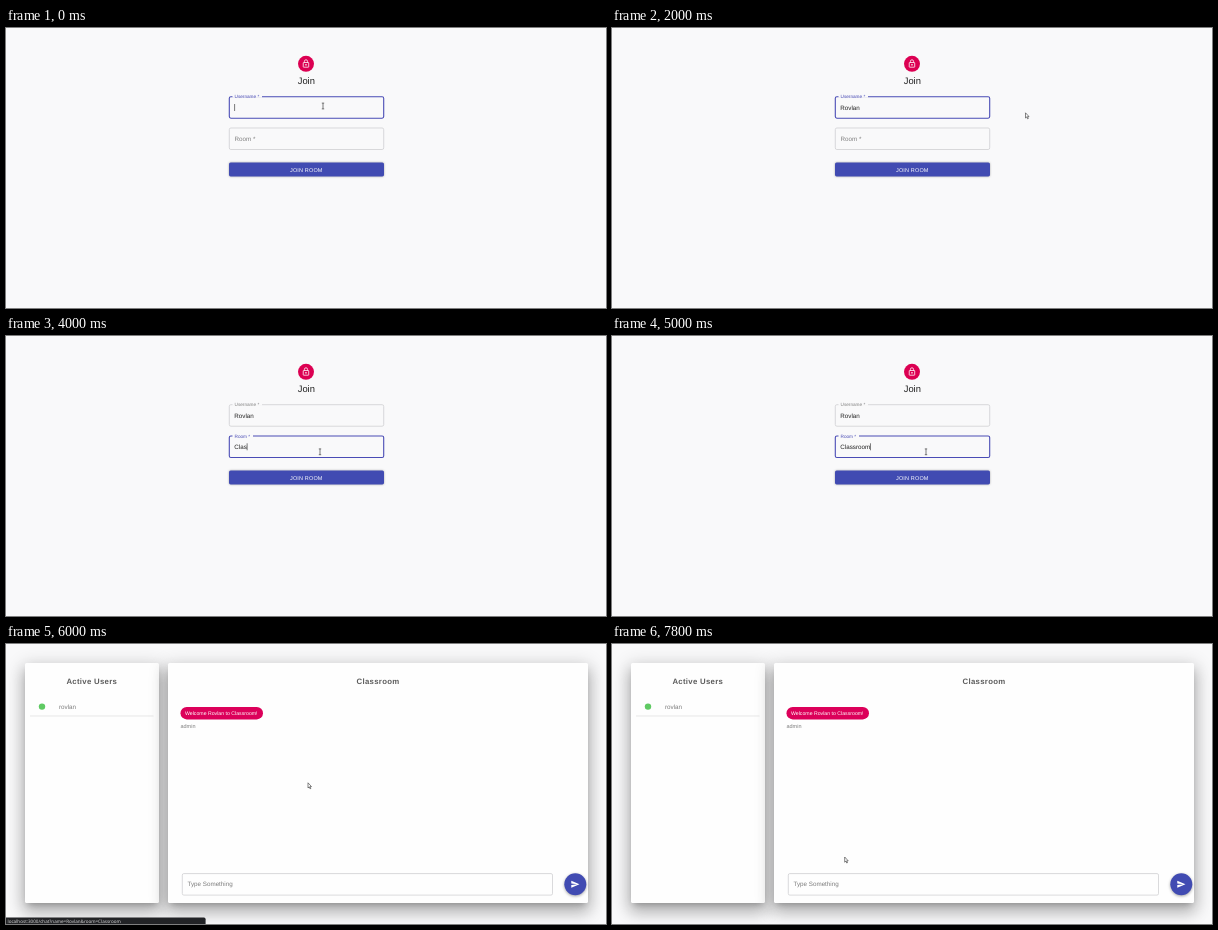
An HTML page for the animation above (8 s loop, 600 by 280 pixels).

```html
<!DOCTYPE html>
<html lang="en">
<head>
<meta charset="utf-8">
<title>Join a room</title>
<style>
  html, body { margin: 0; width: 100%; height: 100%; overflow: hidden; background: #f9f9fa; }
  #stage { position: relative; width: 600px; height: 280px; overflow: hidden; }
  svg { position: absolute; left: 0; top: 0; }
  text { font-family: "Liberation Sans", Arial, sans-serif; font-size: 6.25px; fill: #222; text-rendering: geometricPrecision; white-space: pre; }
  .panel {
    position: absolute; top: 18.5px; height: 240.5px; border-radius: 1.5px; background: #fefefe;
    box-shadow: 0 4px 6px -3px rgba(0,0,0,.24), 0 9px 15px 1px rgba(0,0,0,.18), 0 4px 18px 3px rgba(0,0,0,.16);
  }
  .middle { text-anchor: middle; }
  .title { font-size: 7.8px; font-weight: bold; letter-spacing: .3px; fill: #5c5c5c; }
  .hint { fill: #7c7c7c; }
  .white { fill: #fff; }
  .box { fill: none; stroke: #cbcbcd; stroke-width: .7; }
  .label { fill: #808080; }
  .notch { stroke: #f9f9fa; stroke-width: 2; }
  .caret { stroke: #222; stroke-width: .6; }
  .focus .box { stroke: #4a4cb5; stroke-width: 1.1; }
  .focus .label { fill: #4a4cb5; }
  .list text { font-family: "Open Sans", "Noto Sans", sans-serif; font-size: 5px; font-weight: 600; fill: #f3f3f3; }
  #status text { font-family: "Open Sans", "Noto Sans", sans-serif; font-size: 4.6px; fill: #e2e2e2; }
  #button { fill: #414bb2; filter: drop-shadow(0 .8px .8px rgba(0,0,0,.3)); }
  #button.hover { fill: #333e9c; }
  .send { fill: #414bb2; filter: drop-shadow(0 1.5px 1.8px rgba(0,0,0,.35)); }
</style>
</head>
<body>
<div id="stage">
  <div id="join">
    <svg width="600" height="280">
      <circle cx="300" cy="35.8" r="8" fill="#dc0052"/>
      <g transform="translate(295.3 31) scale(.39)" fill="none" stroke="#fff" stroke-width="2">
        <rect x="5" y="9" width="14" height="12" rx="1"/>
        <path d="M8 9V6a4 4 0 0 1 8 0v3"/>
        <circle cx="12" cy="15" r="2" fill="#fff" stroke="none"/>
      </g>
      <text class="middle" x="300.3" y="56" style="font-size:9.4px">Join</text>
      <g id="user">
        <rect class="box" x="223.3" y="68.7" width="154.4" height="21.5" rx="1.6"/>
        <path class="notch" d="M226.5 68.7H256"/>
        <text class="label" x="228.5" y="70.2" font-size="4.7">Username *</text>
        <text class="value" x="228.3" y="81.7"></text>
        <path class="caret" d="M0 76v7"/>
      </g>
      <g id="room">
        <rect class="box" x="223.3" y="100" width="154.4" height="21.5" rx="1.6"/>
        <path class="notch" d="M226.5 100H247"/>
        <text class="label" x="228.5">Room *</text>
        <text class="value" x="228.3" y="113"></text>
        <path class="caret" d="M0 107.3v7"/>
      </g>
      <rect id="button" x="223" y="134.6" width="155" height="13.8" rx="1.6"/>
      <ellipse id="ripple" cx="301" cy="141.5" rx="48" ry="6.9" fill="#fff" opacity=".2"/>
      <text class="middle white" x="300.3" y="143.5" style="font-size:5.5px;letter-spacing:.157px">JOIN ROOM</text>
      <g id="list" class="list">
        <rect x="222.6" y="90.2" width="155.2" height="91" rx="1" fill="#27292b" style="filter:drop-shadow(0 .8px 1px rgba(0,0,0,.35))"/>
      </g>
    </svg>
  </div>
  <div id="chat">
    <div class="panel" style="left:18.5px;width:134.5px"></div>
    <div class="panel" style="left:162px;width:420px"></div>
    <svg width="600" height="280">
      <text class="title middle" x="85.8" y="40">Active Users</text>
      <circle cx="36" cy="62.6" r="3.2" fill="#5fca63"/>
      <text class="hint" x="53" y="65">rovlan</text>
      <path d="M24 72H147.5" stroke="#dcdcdc" stroke-width=".7"/>
      <text class="title middle" x="372" y="40">Classroom</text>
      <rect x="174.5" y="63" width="82.5" height="12.4" rx="6.2" fill="#dc005a"/>
      <text class="white" x="179" y="71.1" style="font-size:5.2px">Welcome Rovlan to Classroom!</text>
      <text class="hint" x="174.5" y="84.2" style="font-size:5.5px">admin</text>
      <rect class="box" x="176.3" y="229.6" width="370.2" height="21.5" rx="1.5"/>
      <text class="hint" x="181.5" y="242.4">Type Something</text>
      <circle class="send" cx="569.3" cy="240.2" r="11"/>
      <path class="white" transform="translate(564.5 235.5) scale(.39)" d="M2 21 23 12 2 3v7l15 2-15 2z"/>
    </svg>
  </div>
  <svg width="600" height="280">
    <g id="status">
      <path d="M0 273.6H198q1.6 0 1.6 1.6V280H0z" fill="#222326"/>
      <text x="1.5" y="278.9">localhost:3000/chat?name=Rovlan&amp;room=Classroom</text>
    </g>
    <g id="beam" fill="none" stroke="#444" stroke-width=".7">
      <path d="M-1.2-2.9H1.2M0-2.9V2.9M-1.2 2.9H1.2"/>
    </g>
    <g id="arrow" fill="#fff" stroke="#333" stroke-width=".6">
      <path d="M0 0V5.2L1.2 4.1 2 6 2.8 5.7 2 3.8H3.5z"/>
    </g>
    <g id="hand" fill="#fff" stroke="#333" stroke-width=".5">
      <path d="M-.5 0Q0-.6.5 0V2.2L2.7 2.8V4.6L2 6.3H-.7L-2.1 3.9-1.5 3.4-.5 4.2z"/>
    </g>
  </svg>
</div>
<script>
const STEP = 200, STEPS = 40;
const $ = id => document.getElementById(id);
const svgNS = "http://www.w3.org/2000/svg";

["rovlan", "rovlan411", "rovlandormek01@mail.test", "Rovlan", "rovlandormek", "rovlan dormek"].forEach((name, i) => {
  const row = document.createElementNS(svgNS, "text");
  row.setAttribute("x", 227.5);
  row.setAttribute("y", 102.4 + i * 14.1);
  row.textContent = name;
  $("list").append(row);
});

// Pointer stops: step, x, y
const path = [[0, 317, 78], [8, 317, 78], [9, 389, 83], [10, 413.5, 84.8], [11, 408, 90], [12, 372, 106],
  [13, 320, 115], [14, 314, 115.8], [25, 314, 115.8], [27, 304, 136], [28, 302, 138.8],
  [31, 302, 138.8], [33, 292, 151], [36, 258, 192], [39, 232.7, 213]];
// Letters typed: step, count
const userKeys = [[4, 2], [5, 4], [6, 5], [7, 6]];
const roomKeys = [[18, 1], [19, 2], [20, 4], [21, 5], [22, 7], [23, 9]];

const within = (k, from, to) => k >= from && k < to;
const show = (el, on) => { el.style.display = on ? "" : "none"; };
const typed = (word, keys, k) => word.slice(0, keys.reduce((n, [at, count]) => k >= at ? count : n, 0));

function pointerAt(k) {
  const i = Math.max(1, path.findIndex(p => p[0] >= k));
  const [k0, x0, y0] = path[i - 1], [k1, x1, y1] = path[i];
  const f = (k - k0) / (k1 - k0);
  return [x0 + (x1 - x0) * f, y0 + (y1 - y0) * f];
}

function drawField(id, text, focused, caretOn) {
  const field = $(id), value = field.querySelector(".value"), caret = field.querySelector(".caret");
  field.setAttribute("class", focused ? "focus" : "");
  value.textContent = text;
  const end = 228.6 + (text ? value.getComputedTextLength() : 0);
  caret.setAttribute("transform", `translate(${end} 0)`);
  show(caret, focused && caretOn);
}

function draw(k) {
  const chat = k >= 30, hover = within(k, 27, 30);
  show($("join"), !chat);
  show($("chat"), chat);
  show($("status"), within(k, 27, 32));
  show($("list"), within(k, 4, 10));
  show($("ripple"), k === 29);
  $("button").setAttribute("class", hover ? "hover" : "");

  if (!chat) {
    const roomFocus = within(k, 13, 29), floating = k >= 13;
    drawField("user", typed("Rovlan", userKeys, k), k < 13, k !== 1 && !within(k, 9, 11));
    drawField("room", typed("Classroom", roomKeys, k), roomFocus, !within(k, 16, 18) && k < 26);
    const label = $("room").querySelector(".label");
    label.setAttribute("y", floating ? 101.7 : 113);
    label.style.fontSize = floating ? "4.7px" : "6.25px";
    show($("room").querySelector(".notch"), floating);
  }

  const [x, y] = pointerAt(k);
  const shape = hover ? "hand" : k < 9 || within(k, 13, 26) ? "beam" : "arrow";
  for (const id of ["beam", "arrow", "hand"]) {
    show($(id), id === shape);
    $(id).setAttribute("transform", `translate(${x} ${y})`);
  }
}

document.querySelector("#user .label").style.fontSize = "4.7px";
const start = performance.now();
let last = -1;
function tick() {
  const k = Math.floor((performance.now() - start) / STEP) % STEPS;
  if (k !== last) draw(last = k);
  requestAnimationFrame(tick);
}
tick();
</script>
</body>
</html>
```
